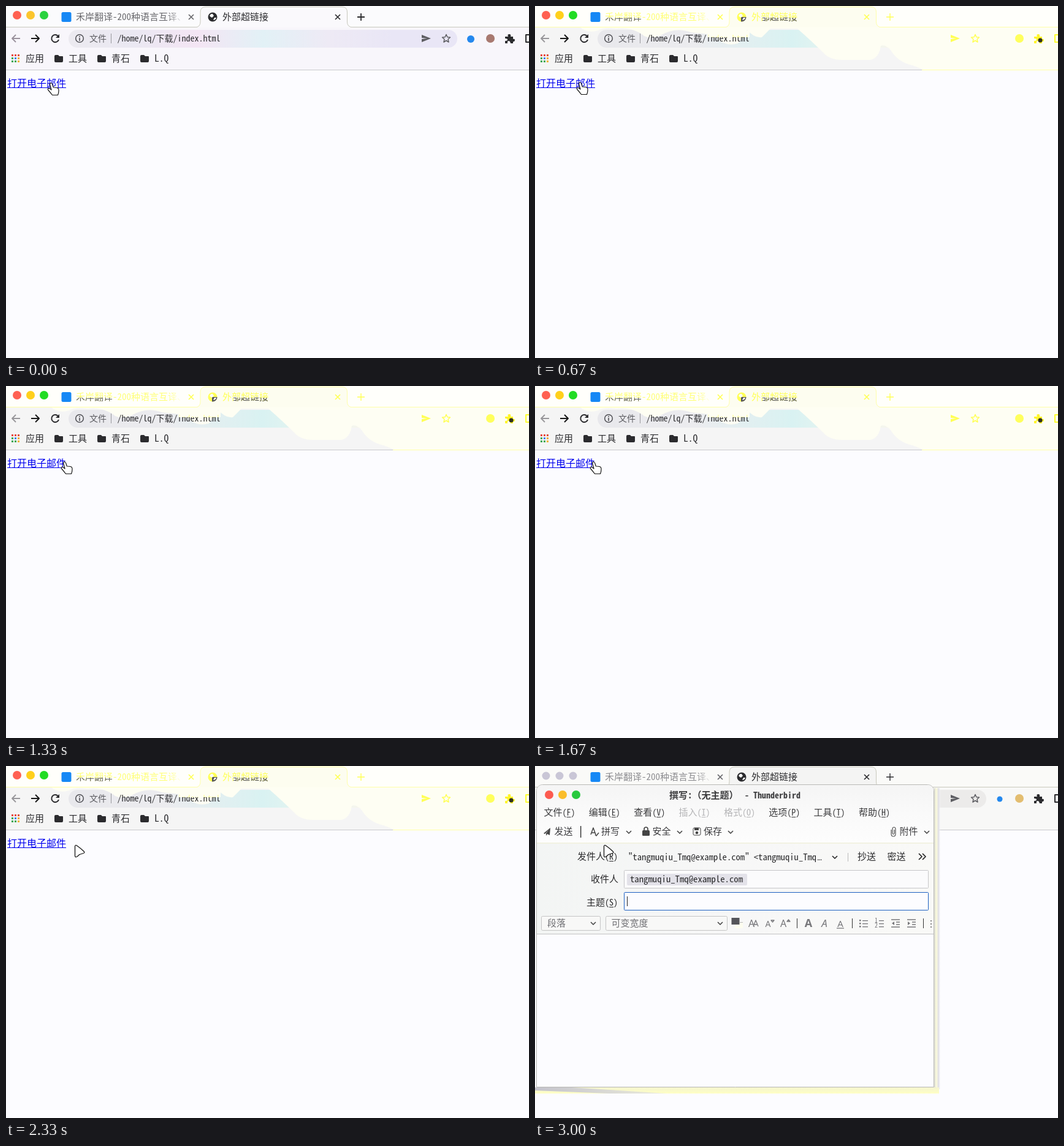
These frames come from a looping animation (853 by 575 pixels, 3330 ms). An HTML page with a canvas:

```html
<!DOCTYPE html>
<html lang="zh-CN">
<head>
<meta charset="utf-8">
<title>外部超链接</title>
<style>
html, body { margin: 0; width: 100%; height: 100%; overflow: hidden; background: #fcfcff; }
canvas { display: block; }
</style>
</head>
<body>
<canvas id="stage" width="853" height="575"></canvas>
<script>
const c = document.getElementById('stage').getContext('2d');
const LOOP = 3330;
const SANS = '"Noto Sans CJK SC", "Noto Sans CJK", sans-serif';
const MONO = '"Noto Sans Mono CJK SC", "Noto Sans Mono", "DejaVu Sans Mono", monospace';
const INK = '#2b2b2e', YELLOW = '#ffff55';

// Advance of one mono letter, in em
c.font = `100px ${MONO}`;
const MONO_EM = c.measureText('m').width / 100;

function rect(x, y, w, h, fill) { c.fillStyle = fill; c.fillRect(x, y, w, h); }

function box(x, y, w, h, r, fill, line) {
  c.beginPath();
  c.roundRect(x, y, w, h, r);
  if (fill) { c.fillStyle = fill; c.fill(); }
  if (line) { c.strokeStyle = line; c.lineWidth = 1; c.stroke(); }
}

function dot(x, y, r, fill) {
  c.fillStyle = fill;
  c.beginPath();
  c.arc(x, y, r, 0, 7);
  c.fill();
}

function shape(d, fill, line, width = 1.5, x = 0, y = 0) {
  c.save();
  c.translate(x, y);
  const p = new Path2D(d);
  if (fill) { c.fillStyle = fill; c.fill(p); }
  if (line) {
    c.strokeStyle = line;
    c.lineWidth = width;
    c.lineJoin = 'round';
    c.stroke(p);
  }
  c.restore();
}

// Chinese runs at `size`; Latin runs in a mono face with the given advance
function text(s, x, y, size, color, adv = size / 2, weight = '') {
  c.fillStyle = color;
  for (const run of s.match(/[\x00-\x7f]+|[^\x00-\x7f]+/g)) {
    const latin = run < '\x7f';
    c.font = `${weight} ${latin ? adv / MONO_EM : size}px ${latin ? MONO : SANS}`;
    c.fillText(run, x, y);
    x += c.measureText(run).width;
  }
}

function clipped(x, y, w, h, draw) {
  c.save();
  c.beginPath();
  c.rect(x, y, w, h);
  c.clip();
  draw();
  c.restore();
}

function across(x0, y0, x1, y1, ...stops) {
  const g = c.createLinearGradient(x0, y0, x1, y1);
  stops.forEach((s, i) => g.addColorStop(i / (stops.length - 1), s));
  return g;
}

const cross = (x, y, col) => shape('M-4 -4L4 4M4 -4L-4 4', null, col, 1.7, x, y);
const chevron = (x, y, col = '#444') => shape('M-4 -2L0 2L4 -2', null, col, 1.6, x, y);
const folder = x => shape('M-7 -4Q-7 -6 -5 -6H-1L1 -4H6Q7 -4 7 -3V4Q7 6 5 6H-5Q-7 6 -7 4Z', INK, null, 1, x, 86);

function globe(col) {
  dot(337, 18, 7.5, col);
  shape('M-5 -2Q-3 -6 0 -5L2 -2L-1 1L-3 0ZM1 5L3 1L6 1Q5 5 1 5Z', '#fbfbfb', null, 1, 337, 18);
}

function tabLabels(col, active) {
  text('禾岸翻译-200种语言互译、', 114, 23, 15, col);
  globe(active);
  text('外部超链接', 353, 23, 15, active);
}

function tabs(mode, late, lights) {
  const pale = mode === 1;
  const strip = ['#fbfbfd', '#fffffb', '#fafaf8'][mode];
  const edge = pale ? '#ffffa8' : '#c8c8bc';
  const ink = pale ? YELLOW : INK;
  rect(0, 0, 853, 35, strip);
  rect(0, 34, 853, 1, edge);
  shape('M309 35Q317 34 317 26V10Q317 1.5 326 1.5H548Q556.5 1.5 556.5 10V26Q556.5 34 565 35',
    ['#faf9fc', '#fdfdf0', '#f4f4f3'][mode], edge, 1);
  lights.forEach((col, i) => dot(18 + 22 * i, late ? 16 : 15, late ? 6.5 : 7, col));
  box(90.5, 10, 16, 16, 2.5, '#1688f5');
  tabLabels(['#68686c', '#ffff78', '#8c8c90'][mode], ink);
  if (pale) {
    const dark = () => tabLabels('#66666a', '#55555a');
    clipped(336, 18, 10, 9, dark);
    if (late) {
      clipped(120, 21, 40, 5, dark);
    } else {
      clipped(115, 19, 58, 8, dark);
      clipped(371, 19, 58, 8, dark);
    }
  }
  rect(262, 6, 31, 24, across(262, 0, 288, 0, strip + '00', strip));
  cross(302, 18, pale ? YELLOW : '#66666a');
  cross(541, 18, ink);
  shape('M-6 0H6M0 -6V6', null, ink, mode ? 1.4 : 1.8, 579, 18);
}

function tools(mode, late) {
  const pale = mode === 1;
  rect(0, 35, 853, 70, ['#f8f6fb', '#f5f5f5', '#f8f8f7'][mode]);
  rect(0, 104, 853, 1, '#c9c9cc');
  const wash = pale
    ? across(102, 0, 736, 0, '#e8e8ec', '#ececef', late ? '#e4e2fb' : '#d9f2f2', '#f6f6ed', '#fbfbf0')
    : across(102, 60, 736, 40, '#eceaf0', '#eae8f2', '#f4e5f4', '#e2f1f6', '#eeeaf5', '#e9e6f6', '#e9e6f6');
  box(102, 39, 634, 29, 14.5, mode === 2 ? '#ecebea' : wash);
  if (pale) {
    shape('M74 35Q86 45 103 40Q112 34 132 37Q160 34 178 49Q190 55 207 47Q230 34 254 43L292 47' +
      'Q308 68 331 61Q340 49 346 39Q358 53 370 51L384 37H428Q454 60 470 76Q480 88 500 88H546' +
      'Q561 86 564 65Q571 62 580 72Q592 92 616 97L634 104H853V35Z', '#fefef3');
    shape('M631 104.5H853', null, '#ffffa8', 1);
  }
  shape('M7 0H-6M0 -6L-6 0L0 6', null, pale ? '#98979b' : '#9b929d', 1.8, 16, 53);
  shape('M-7 0H6M0 -6L6 0L0 6', null, '#171717', 1.9, 48, 53);
  shape('M4.7 -4A6 6 0 1 0 6 2', null, INK, 2, 80, 53);
  shape('M7 -7V-1H1Z', INK, null, 1, 80, 53);
  c.strokeStyle = '#505055';
  c.lineWidth = 1.5;
  c.beginPath();
  c.arc(120, 53, 6.3, 0, 7);
  c.stroke();
  rect(119.2, 52, 1.6, 5, '#505055');
  rect(119.2, 49, 1.6, 1.7, '#505055');
  text('文件', 136, 58, 14, '#5c5c61');
  rect(171, 45, 1, 16, '#99999d');
  const url = col => text('/home/lq/下载/index.html', 181.5, 58, 14, col, 7);
  url(INK);
  if (pale) {
    clipped(281, 40, 69, 11, () => {
      rect(281, 40, 69, 11, '#fefef3');
      url('#ffffa0');
    });
  }
  const ink = pale ? YELLOW : '#5d5d62';
  shape('M-7 -6L8 0L-7 6V1L2 0L-7 -1Z', ink, null, 1, 685, 53);
  shape('M0 -6.5L1.9 -2.2L6.5 -1.8L3 1.3L4 6L0 3.5L-4 6L-3 1.3L-6.5 -1.8L-1.9 -2.2Z', null, ink, 1.5, 718, 53);
  if (!pale) dot(758, 54, mode ? 4.5 : 6, '#2488ee');
  dot(790, 53, 7, pale ? '#ffff5c' : mode ? '#e3bd70' : '#a87970');
  shape('M-7 -4H-2Q-4 -8 0 -8Q3 -8 2 -4H6V0Q9 -1 9 2Q8 5 6 4V7H2Q1 3 -1 3Q-4 3 -3 7H-7V3Q-3 3 -3 1Q-3 -1 -7 -1Z',
    pale ? '#fff52a' : INK, null, 1, 821, 54);
  if (pale) dot(824, 56, 3.5, '#30301c');
  shape('M854 47H848V59H854', null, pale ? '#ffff30' : INK, 2);
}

function bookmarks() {
  const hues = ['#e9483c', '#e9483c', '#e0503c', '#35a853', '#3b7ded', '#f0a92b', '#35a853', '#35a853', '#f2b42b'];
  hues.forEach((h, i) => rect(9 + 5 * (i % 3), 79 + 5 * (i / 3 | 0), 3, 3, h));
  text('应用', 32, 91, 15, INK);
  [['工具', 86], ['青石', 156], ['L.Q', 226]].forEach(([s, x]) => {
    folder(x);
    text(s, x + 16, 91, 15, INK, 7.8);
  });
}

function page() {
  rect(0, 105, 853, 470, '#fcfcff');
  text('打开电子邮件', 2, 132, 16, '#0000ee');
  rect(2, 133, 96, 1, '#0000ee');
}

function hand(dx, dy) {
  shape('M71.5 128Q72 125.5 74 126Q75.5 126.5 76 129L77.3 133L83 133.5Q86 134 86 138Q86 142 84.5 145.5' +
    'H75.5Q73 142 69 137.5Q67.5 135.5 69 134.5Q71 134 74 137Z', '#fff', '#161616', 1.2, dx, dy);
}

function arrow() {
  shape('M112.5 131.5Q113 129 115.5 130.5Q122 135 127 140Q129 142 126.5 143L120 145L116 148.5' +
    'Q112.5 150.5 112.5 147Z', '#fff', '#161616', 1.3, 0, -0.5);
}

// Menu entry with an underlined access key
function menu(label, key, x, y, col = '#333') {
  text(`${label}(${key})`, x, y, 15, col, 7);
  rect(x + label.length * 15 + 7, y + 2, 7, 1, col);
}

function letter(x, extra, style = '', size = 16) {
  c.font = `${style} ${size}px "Noto Sans", sans-serif`;
  c.fillStyle = '#77777b';
  c.textAlign = 'center';
  c.fillText('A', x, 263);
  c.textAlign = 'left';
  if (extra) shape(extra, null, '#77777b', 1.3, x, 257);
}

function formatBar() {
  box(10.5, 245.5, 96, 23, 2, '#f8f8f7', '#c5c5c5');
  text('段落', 20, 262, 15, '#707074');
  chevron(95, 257);
  box(115.5, 245.5, 198, 23, 2, '#f8f8f7', '#c5c5c5');
  text('可变宽度', 124.5, 262, 15, '#707074');
  chevron(302, 257);
  rect(326, 255, 13, 10, '#fdfdef');
  rect(334, 255, 5, 1, '#bbb');
  rect(320.5, 248, 13, 11, '#55555a');
  letter(353, 'M3 5L7 -5L11 5M5 2H9');
  letter(380, 'M5 -5H10L7.5 -2Z', '', 14);
  letter(405, 'M6 -3H11L8.5 -6Z');
  letter(446, '', 'bold', 18);
  letter(472, '', 'italic', 17);
  letter(498, 'M-6 8H6', '', 15);
  [427, 517, 633].forEach(x => rect(x, 249, 1, 16, '#333'));
  for (let i = 0; i < 3; i++) {
    const y = 252 + 5 * i;
    rect(529, y - 1, 2.5, 2.5, '#77777b');
    rect(534, y, 9, 1.3, '#77777b');
    rect(561, y, 8, 1.3, '#77777b');
    rect(645, y, 2, 2, '#888');
  }
  text('1', 554, 256, 8, '#77777b', 5);
  text('2', 554, 264, 8, '#77777b', 5);
  [[588, -1], [614, 1]].forEach(([x, d]) => {
    shape('M-7 -6H7M1 -2H7M1 2H7M-7 6H7', null, '#77777b', 1.5, x, 257);
    shape(`M${-4 - 2 * d} -3L${-4 + 2 * d} 0L${-4 - 2 * d} 3Z`, '#77777b', null, 1, x, 257);
  });
}

function compose() {
  // Soft shadow on the right and below
  rect(651, 36, 11, 492, across(651, 0, 662, 0, '#d9d9d4', '#fbfbdc', '#dfdee6', '#fcfcff00'));
  rect(0, 525, 659, 10, across(0, 525, 0, 535, '#f4f4d0', '#ffffc4'));
  shape('M0 525H60L215 535H120L0 530Z', across(0, 0, 215, 0, '#c4c3cc', '#ececdc'));
  box(2.5, 30.5, 648, 494, [10, 10, 0, 0], '#fcfcff', '#b9b9b6');
  c.save();
  c.beginPath();
  c.roundRect(3, 31, 647, 493, [9, 9, 0, 0]);
  c.clip();
  rect(3, 31, 647, 95, across(0, 31, 0, 126, '#f5f5f5', '#fafafa', '#fdfdfd'));
  rect(3, 126, 647, 148, across(3, 0, 650, 0, '#f3f5f4', '#f7f7f7', '#f9f9f7'));
  rect(3, 125, 647, 2, '#f2f2e2');
  rect(3, 274, 647, 1, '#c3c3c3');
  c.restore();
  ['#fc5b50', '#fabd2b', '#28c93e'].forEach((h, i) => dot(23 + 22 * i, 47, 7, h));
  text('撰写:（无主题）', 219, 53, 15, '#3b3b3d', 7.5, 'bold');
  text('- Thunderbird', 342, 53, 14, '#3b3b3d', 7, 'bold');
  [['文件', 'F'], ['编辑', 'E'], ['查看', 'V'], ['插入', 'I'], ['格式', 'O'], ['选项', 'P'], ['工具', 'T'], ['帮助', 'H']]
    .forEach(([s, k], i) => menu(s, k, 14.5 + 73.35 * i, 81, i === 3 || i === 4 ? '#b5b5b7' : '#3a3a3c'));

  shape('M-6 3L5 -6L4 6L0 4L-2 7L-2 3L3 -3L-4 4Z', '#444', null, 1, 20, 107);
  rect(74, 98, 1.3, 19, '#222');
  shape('M-6 5L-2 -6L2 5M-5 2H1M1 5L3 7L7 2', null, '#444', 1.5, 97, 107);
  box(175, 105, 12, 9, 1.5, '#444');
  shape('M178 106V103Q178 100 181 100Q184 100 184 103V106', null, '#444', 1.7);
  box(258, 101, 12, 12, 2, null, '#444');
  rect(260, 101, 7, 4, '#444');
  dot(264, 109, 2.3, '#444');
  shape('M581 104V111Q581 115 584.5 115Q588 115 588 111V103Q588 100 585.5 100Q583 100 583 103V110Q584.5 113 586 110V104',
    null, '#555', 1.2);
  [['发送', 31.5], ['拼写', 108], ['安全', 191.5], ['保存', 275], ['附件', 594.5]]
    .forEach(([s, x]) => text(s, x, 112, 15, '#3c3c3f'));
  [153, 236, 319, 639].forEach(x => chevron(x, 108));

  menu('发件人', 'R', 69, 153, '#29292b');
  text('"tangmuqiu_Tmq@example.com" <tangmuqiu_Tmq', 152, 154, 14, '#29292b', 7.32);
  [461, 463.5, 466].forEach(x => rect(x, 152.5, 1.3, 1.5, '#29292b'));
  chevron(489, 149, '#222');
  rect(510, 142, 1, 14, '#bbb');
  text('抄送', 526, 153, 15, '#29292b');
  text('密送', 574.5, 153, 15, '#29292b');
  shape('M-5 -5L0 0L-5 5M1 -5L6 0L1 5', null, '#222', 1.7, 631, 148);
  text('收件人', 91, 190, 15, '#29292b');
  box(145.5, 170.5, 496, 29, 1, '#fbfbfc', '#c6c6c8');
  box(150, 176, 196, 19, 2, '#e3e2e9');
  text('tangmuqiu_Tmq@example.com', 155, 190, 14, '#29292b', 7.36);
  menu('主题', 'S', 84, 228, '#29292b');
  box(145.5, 206.5, 496, 29, 1, '#fcfcff', '#1c5fc0');
  rect(150, 213, 1, 16, '#222');
  formatBar();
}

function draw(t) {
  const mode = t < 330 ? 0 : t < 3000 ? 1 : 2;
  const late = t >= 2670;
  const gray = '#c9c6d6';
  tabs(mode, late, late ? [gray, gray, mode === 1 ? '#dddcb8' : gray]
    : ['#ff6152', mode ? '#ffd01c' : '#fbc52e', mode ? '#22dc24' : '#2ad23f']);
  tools(mode, late);
  bookmarks();
  page();
  if (mode === 2) compose();
  if (t < 330) hand(0, 0);
  else if (t < 1330) hand(0, -1);
  else if (t < 2000) hand(22, -2);
  else arrow();
}

const start = performance.now();
function tick() {
  draw((performance.now() - start) % LOOP);
  requestAnimationFrame(tick);
}
tick();
</script>
</body>
</html>
```
